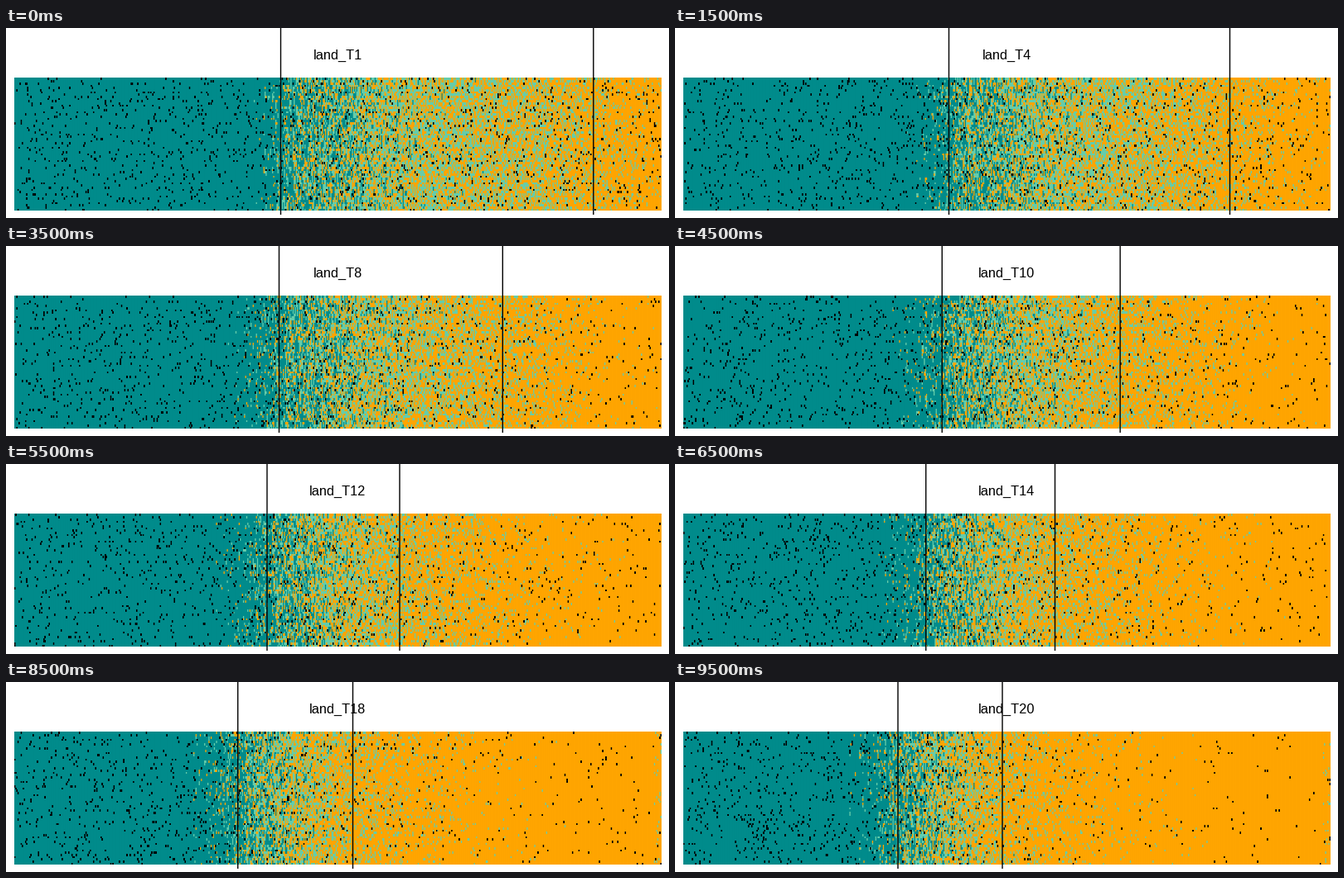
Write a matplotlib script that moves like this. It is 800 by 230 pixels and loops after 10 s.

```python
import numpy as np
import matplotlib.pyplot as plt
from matplotlib.animation import FuncAnimation

W, H, DPI = 800, 230, 80
STEPS, INTERVAL = 20, 500
LEFT, RIGHT, TOP, BOTTOM = 10, 791, 60, 221
COLS, ROWS = 600, 60

TEAL, AQUA, ORANGE = np.array([[0, 139, 139], [102, 205, 170], [255, 165, 0]]) / 255

# Boundary lines and composition profiles at a few key steps.
LINE_STEPS = [1, 4, 6, 8, 12, 16, 20]
LINES = np.array([[331.5, 330.5, 328.5, 329.5, 315, 290.5, 269],
                  [708.8, 669.5, 604, 599.3, 475, 442, 395]])

KEY_STEPS = [1, 6, 8, 12, 16, 20]
TEAL_SHARE = [1, .85, .55, .4, .15, .04, 0]
TEAL_X = np.array([[305, 328, 345, 400, 450, 500, 570],
                   [282, 318, 338, 385, 438, 488, 555],
                   [275, 315, 335, 375, 430, 480, 550],
                   [255, 303, 325, 355, 395, 440, 500],
                   [238, 280, 300, 320, 355, 390, 450],
                   [212, 250, 275, 295, 325, 360, 410]])
AQUA_SHARE = [.6, .5, .4, .25, .1, .03, 0]
AQUA_X = np.array([[340, 540, 640, 705, 765, 795, 860],
                   [330, 460, 540, 610, 690, 745, 810],
                   [330, 450, 520, 600, 670, 730, 800],
                   [310, 400, 450, 510, 590, 660, 760],
                   [280, 360, 400, 450, 530, 600, 720],
                   [250, 325, 355, 395, 460, 535, 650]])


def at_step(step, steps, columns):
    return np.array([np.interp(step, steps, c) for c in columns])


def to_uniform(z):
    """Replace values by their rank, scaled to 0..1."""
    ranks = np.empty(z.size)
    ranks[z.ravel().argsort()] = np.arange(z.size) / z.size
    return ranks.reshape(z.shape)


def streaky(rng):
    """Unit noise that is slightly correlated down each column."""
    a = rng.standard_normal((ROWS, COLS))
    return (a + .6 * np.roll(a, 1, 0) + .3 * np.roll(a, 2, 0)) / np.sqrt(1.45)


def column_weights(width):
    """Share of each cell column in each pixel column."""
    edges = np.linspace(0, COLS, width + 1)[:, None]
    cells = np.arange(COLS)
    overlap = np.minimum(edges[1:], cells + 1) - np.maximum(edges[:-1], cells)
    return np.clip(overlap, 0, None) * width / COLS


base_rng = np.random.default_rng(7)
base_teal, base_aqua = streaky(base_rng), base_rng.standard_normal((ROWS, COLS))
cell_x = LEFT + (np.arange(COLS) + .5) * (RIGHT - LEFT) / COLS
jitter = base_rng.normal(0, 7, COLS) + base_rng.normal(0, 4, (ROWS, 1))
weights = column_weights(RIGHT - LEFT)
row_index = np.arange(BOTTOM - TOP) * ROWS // (BOTTOM - TOP)


def landscape(step):
    rng = np.random.default_rng(100 + step)
    teal_rank = to_uniform(.8 * base_teal + .6 * streaky(rng))
    aqua_rank = to_uniform(.75 * base_aqua + .66 * rng.standard_normal((ROWS, COLS)))

    teal = teal_rank < np.interp(cell_x + jitter, at_step(step, KEY_STEPS, TEAL_X.T), TEAL_SHARE)
    aqua_share = np.interp(cell_x, at_step(step, KEY_STEPS, AQUA_X.T), AQUA_SHARE)
    if step > 15:
        aqua_share = np.maximum(aqua_share, .08 * (cell_x > 782))
    aqua = ~teal & (aqua_rank < aqua_share)

    bare_share = np.where(teal | aqua, .045, np.interp(step, [1, 20], [.022, .008]))
    bare = rng.random((ROWS, COLS)) < bare_share

    cells = np.where(teal[..., None], TEAL, np.where(aqua[..., None], AQUA, ORANGE))
    pixels = np.einsum('pc,rck->rpk', weights, cells, optimize=True)
    dark = np.clip(1.5 * bare @ weights.T, 0, 1)
    return np.clip(pixels * (1 - dark[..., None]), 0, 1)[row_index]


fig = plt.figure(figsize=(W / DPI, H / DPI), dpi=DPI, facecolor='white')
ax = fig.add_axes([0, 0, 1, 1])
ax.axis('off')
image = ax.imshow(landscape(1), extent=(LEFT, RIGHT, BOTTOM, TOP),
                  interpolation='nearest', aspect='auto')
ax.set(xlim=(0, W), ylim=(H, 0))
bounds = [ax.plot([0, 0], [0, 226], color='black', lw=1.4 * 72 / DPI, snap=False,
                  solid_capstyle='butt')[0] for _ in range(2)]
title = ax.text(400, 38, '', family='Liberation Sans', size=16.4 * 72 / DPI,
                ha='center', va='baseline', color='black')


def update(i):
    step = i + 1
    image.set_data(landscape(step))
    for line, x in zip(bounds, at_step(step, LINE_STEPS, LINES)):
        line.set_xdata([x, x])
    title.set_text(f'land_T{step}')
    return [image, *bounds, title]


anim = FuncAnimation(fig, update, frames=STEPS, interval=INTERVAL, repeat=True, repeat_delay=0)
plt.show()
```
